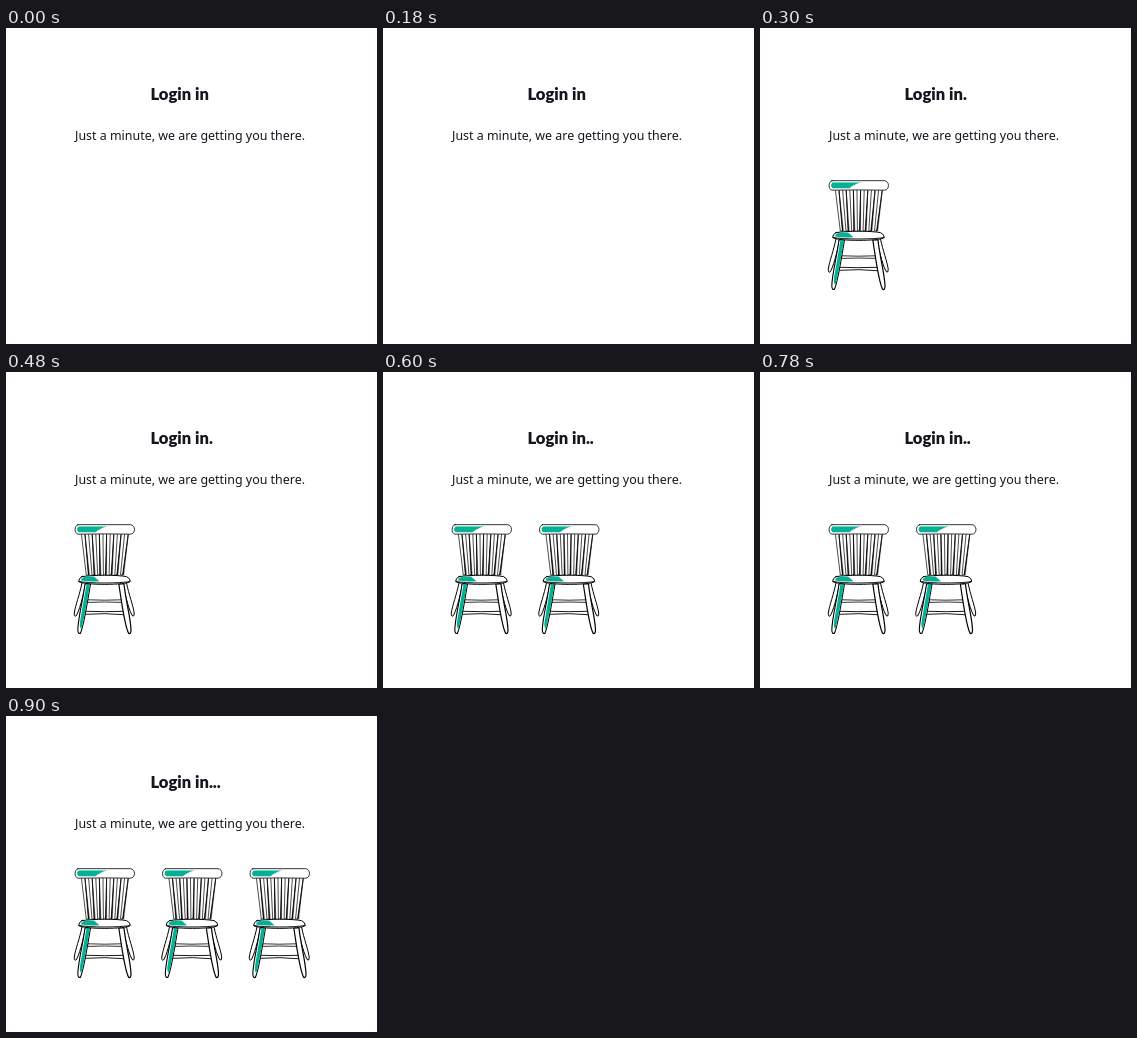
Write an HTML page with a canvas that moves like this. It is 371 px wide and 316 px high and loops after 1200 ms.

```html
<!DOCTYPE html>
<html lang="en">
<head>
<meta charset="utf-8">
<title>Login</title>
<style>
html, body { margin: 0; width: 100%; height: 100%; overflow: hidden; background: #fff; }
canvas { display: block; }
</style>
</head>
<body>
<canvas id="stage" width="371" height="316"></canvas>
<script>
const ctx = document.getElementById('stage').getContext('2d');
const STEP = 300, CHAIRS = 3, GAP = 87.5;
const INK = '#000', TEAL = '#04b194', TEXT = '#15151f';

function shape(d, fill, width = 1) {
  const p = new Path2D(d);
  if (fill) { ctx.fillStyle = fill; ctx.fill(p); }
  if (width) { ctx.strokeStyle = INK; ctx.lineWidth = width; ctx.stroke(p); }
}

// tapered rod with a heavier right side
function spindle(top, bottom) {
  shape(`M${top - 1.8} 162 L${bottom - 1.2} 203 H${bottom + 1.2} L${top + 1.8} 162`, '#fff', 0.7);
  shape(`M${top + 1.8} 163 L${bottom + 0.8} 203 H${bottom + 1.6} Z`, INK, 0.5);
}

function chair(x) {
  ctx.save();
  ctx.translate(x, 0);
  ctx.lineJoin = ctx.lineCap = 'round';

  // back legs
  shape('M76 211 C73.5 223 69.5 233 68.3 241 Q68 245 70 244 C73 240 77 225 79.5 212', '#fff', 1);
  shape('M120.5 211 C123 223 127 233 128.2 241 Q128.4 245 126.6 244 C123.5 240 119.5 225 117 212', '#fff', 1);

  // stretchers
  shape('M82 227.8 Q98 228.6 116 227.8 V230.4 Q98 229.6 82 230.4 Z', '#fff', 0.8);
  shape('M80 239.3 Q98 240 119 239.3 V242.8 Q99 240.8 79 242.3 Z', '#fff', 0.9);

  // front legs
  shape('M79 212 C77 228 72 246 71.8 258 Q72 262 74.3 261.5 C78 254 81 232 84.5 212 Z', '#fff', 1.1);
  shape('M80.5 212 H84 C81.5 228 78.5 244 75.5 257 Q73 256 74.3 248 Z', TEAL, 0);
  shape('M118 212 C119.5 228 124.8 246 125 258 Q125 262 122.7 261.5 C118.5 254 116 232 112.8 212 Z', '#fff', 1.2);

  // back
  for (let i = 0; i < 7; i++) spindle(77.2 + i * 7.2, 81.5 + i * 5.7);

  // seat
  shape('M76 204.6 C87 202.8 111 202.8 120.5 204.6 Q124.5 206.5 124.2 209.5 C121 213.3 77 213.3 72.7 209.5 Q72.4 206.5 76 204.6 Z', '#fff', 1);
  shape('M73 209.5 C82 211.5 115 211.5 124 209.5', null, 0.9);
  shape('M77.5 205.2 Q82 204.2 88 204.6 L93.5 209.3 Q82 210 75 208.4 Q75 206 77.5 205.2 Z', TEAL, 0);

  // top rail
  shape('M72 152.7 H124.5 C129.8 153 129.8 162 124.5 162.2 Q99 161.6 72 162.2 C68 161.5 68 153.5 72 152.7 Z', '#fff', 0.8);
  shape('M72.5 154.6 H101 Q93.5 156.5 89.5 160.3 H72.5 Q69.7 157.5 72.5 154.6 Z', TEAL, 0);

  ctx.restore();
}

function draw(now) {
  const count = Math.floor(now / STEP) % (CHAIRS + 1);
  ctx.fillStyle = '#fff';
  ctx.fillRect(0, 0, 371, 316);
  ctx.fillStyle = TEXT;
  ctx.font = '900 16.6px Lato, "Open Sans", sans-serif';
  ctx.fillText('Login in' + '.'.repeat(count), 144.4, 72);
  ctx.font = '12.45px "Noto Sans", "Open Sans", sans-serif';
  ctx.fillText('Just a minute, we are getting you there.', 69, 112);
  for (let i = 0; i < count; i++) chair(i * GAP);
}

const start = performance.now();
function tick() {
  draw(performance.now() - start);
  requestAnimationFrame(tick);
}
tick();
</script>
</body>
</html>
```
